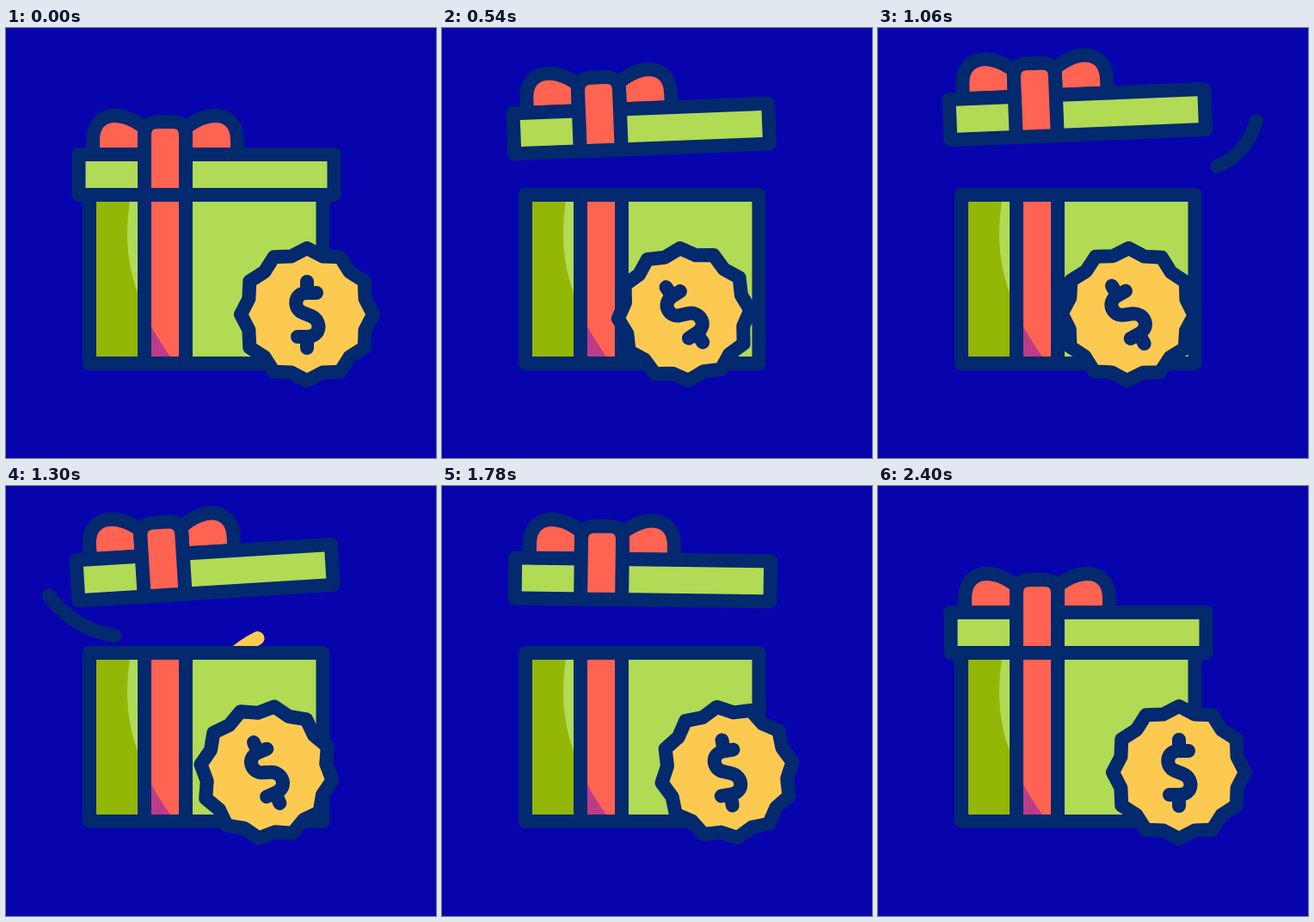
These frames come from a looping animation (500 by 500 pixels, 2420 ms). An HTML page without scripts:

```html
<!DOCTYPE html>
<html lang="en">
<head>
<meta charset="utf-8">
<title>Gift box</title>
<style>
  :root {
    --navy: #03296f;
    --lime: #b1da55;
    --olive: #93b706;
    --coral: #ff6352;
    --plum: #bd3c88;
    --gold: #fdca51;
    --sine: cubic-bezier(.37, 0, .63, 1);
    --loop: 2.42s;
  }
  html, body { margin: 0; height: 100%; overflow: hidden; background: #0804ad; }
  svg { display: block; width: 100%; height: 100%; }

  .line { fill: none; stroke: var(--navy); stroke-width: 16; stroke-linecap: round; stroke-linejoin: round; }
  .lime { fill: var(--lime); }
  .olive { fill: var(--olive); }
  .coral { fill: var(--coral); }
  .plum { fill: var(--plum); }
  .gold { fill: var(--gold); }

  .lid {
    transform-origin: 233px 201px;
    animation: lift var(--loop) var(--sine) infinite, rock var(--loop) var(--sine) infinite;
  }
  .badge { animation: roll var(--loop) var(--sine) infinite; }

  .streamer {
    stroke-width: 16;
    stroke-dasharray: 55 200;
    stroke-dashoffset: 60;
    animation: shoot var(--loop) linear var(--start) infinite backwards;
  }
  .streamer.bright { stroke: var(--gold); }

  /* The moves span 2400 ms; the last 20 ms hold the rest pose. */
  @keyframes lift {
    0%, 99.174%, 100% { translate: 0 0; }
    33.058%, 66.116% { translate: 0 -70px; }
  }
  @keyframes rock {
    0%, 99.174%, 100% { rotate: 0deg; }
    16.529%, 49.587%, 82.645% { rotate: -5deg; }
    33.058%, 66.116% { rotate: 5deg; }
  }
  @keyframes roll {
    0%, 99.174%, 100% { translate: 0 0; rotate: 0deg; }
    24.793% { translate: -70px 0; rotate: -34.5deg; }
  }
  @keyframes shoot {
    0% { stroke-dashoffset: 60; }
    16.529%, 100% { stroke-dashoffset: -110; }
  }
</style>
</head>
<body>
<svg viewBox="0 0 500 500">
  <g>
    <path class="line streamer bright" style="--start: 571ms" pathLength="100" d="M165 194Q135 172 97 167Q62 160 45 102"/>
    <path class="line streamer" style="--start: 785ms" pathLength="100" d="M312 204Q332 172 372 166Q424 160 440 108"/>
    <path class="line streamer" style="--start: 1079ms" pathLength="100" d="M180 194Q155 177 127 174Q82 168 50 128Q45 121 41 112"/>
    <path class="line streamer bright" style="--start: 1246ms" pathLength="100" d="M262 198Q300 164 350 164Q412 160 440 118"/>
  </g>

  <g>
    <rect class="lime" x="97" y="194" width="271.500" height="196"/>
    <path class="olive" d="M97 194H145C138 238 140 275 155 313L161 390H97Z"/>
    <rect class="coral" x="161" y="194" width="48" height="196"/>
    <path class="plum" d="M161 331Q174 360 197 390H161Z"/>
    <path class="line" d="M97 194H368.500V390H97ZM161 194V390M209 194V390"/>
  </g>

  <g class="lid">
    <path id="bow" class="line" style="fill: var(--coral)" d="M101 147V131C101 100 130 92 161 116V147Z"/>
    <use href="#bow" transform="matrix(-1 0 0 1 370 0)"/>
    <rect class="line" style="fill: var(--lime)" x="84.500" y="147" width="297" height="47"/>
    <path class="line" style="fill: var(--coral)" d="M161 194V125Q161 109 177 109H193Q209 109 209 125V194Z"/>
  </g>

  <g transform="translate(350 333)">
    <g class="badge">
      <path class="line" style="fill: var(--gold)" d="M0-77L18.100-67.600 38.500-66.700 49.500-49.500 66.700-38.500 67.600-18.100
        77 0 67.600 18.100 66.700 38.500 49.500 49.500 38.500 66.700 18.100 67.600
        0 77-18.100 67.600-38.500 66.700-49.500 49.500-66.700 38.500-67.600 18.100
        -77 0-67.600-18.100-66.700-38.500-49.500-49.500-38.500-66.700-18.100-67.600Z"/>
      <path class="line" d="M11-25H0C-16-25-16-6-5-2L5 2C17 7 17 26 0 26H-11M0-38V-25M0 26V39"/>
    </g>
  </g>
</svg>
</body>
</html>
```
